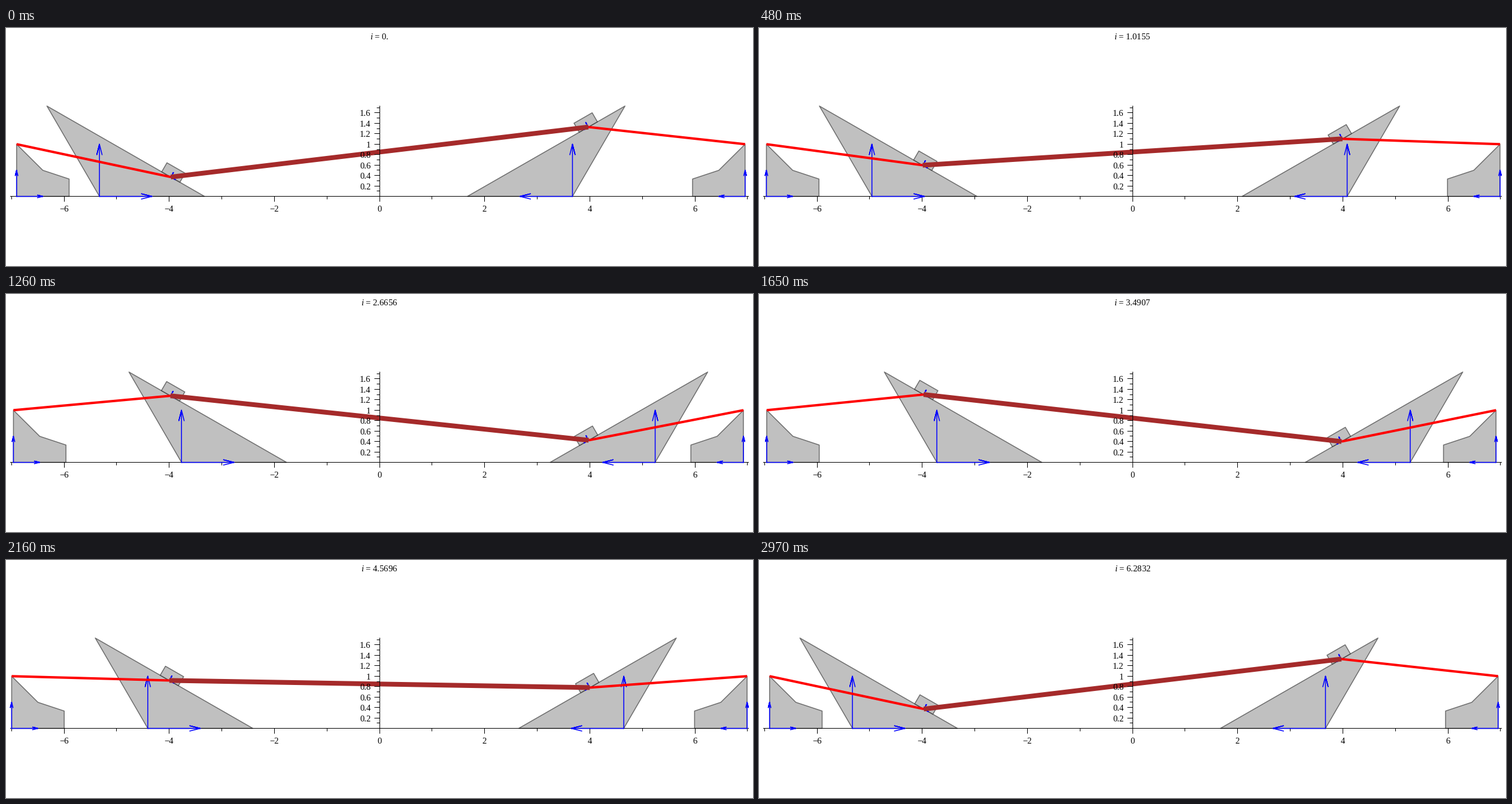
Write a matplotlib script that moves like this. It is 1248 px wide and 398 px high and loops after 3 s.

```python
import numpy as np
import matplotlib.pyplot as plt
from matplotlib.animation import FuncAnimation

W, H, DPI = 1248, 398, 100
FRAMES, INTERVAL = 100, 30
X0, Y0 = 624.1, 281.6          # plot origin in pixels
SX, SY = 87.83, 87.3           # pixels per unit
PIVOT, ARM, LINK, SWING = 0.85, 4.0, 3.0, 0.12
ROOT3 = np.sqrt(3)
PT = 72 / DPI                  # points per pixel

plt.rcParams.update({
    "font.family": "Liberation Serif",
    "font.size": 14.67 * PT,
    "mathtext.fontset": "custom",
    "mathtext.rm": "Liberation Serif",
    "mathtext.it": "Liberation Serif:italic",
    "path.snap": False,
})

fig = plt.figure(figsize=(W / DPI, H / DPI), dpi=DPI, facecolor="white")
ax = fig.add_axes([0, 0, 1, 1])
ax.set_xlim(0, W)
ax.set_ylim(H, 0)
ax.axis("off")


def to_px(points):
    return np.asarray(points, float) * (SX, -SY) + (X0, Y0)


def crisp(value):
    """Centre of the pixel that holds the value."""
    return np.floor(value) + 0.5


def segment(xs, ys, z):
    ax.plot(xs, ys, color="black", lw=PT, zorder=z, solid_capstyle="butt")


def draw_axes():
    cx, cy = crisp(X0), crisp(Y0)
    segment([7, 1241], [cy, cy], 2)
    segment([cx, cx], [130, cy], 6)
    for n in range(-7, 8):
        x = crisp(X0 + n * SX)
        major = n % 2 == 0
        segment([x, x], [cy, cy + (9 if major else 5)], 2)
        if major:
            label = str(n).replace("-", "\u2212")
            ax.text(x, 307, label, ha="center", va="baseline", zorder=7)
    for n in range(1, 18):
        y = crisp(Y0 - n / 10 * SY)
        major = n % 2 == 0
        segment([cx - (9 if major else 5), cx], [y, y], 6)
        if major:
            ax.text(609.5, y + 5.5, f"{n / 10:g}", ha="right",
                    va="baseline", zorder=7)


def arrow(direction, length):
    """Open-headed arrow from the local origin."""
    d = np.array(direction) * length
    side = np.array([-d[1], d[0]]) * 0.05
    back = d * 0.8
    return np.array([(0, 0), d, back + side, d, back - side])


# Local shapes; x points towards the middle of the stage.
DOWNHILL, NORMAL = (ROOT3 / 2, -0.5), (0.5, ROOT3 / 2)
WEDGE = np.array([(0, 0), (2, 0), (-1, ROOT3)])
STOPPER = np.array([(0, 0), (0, 1), (0.5, 0.5), (1, 1 / 3), (1, 0)])
BLOCK = np.array([(-0.2, 0), (0.2, 0), (0.2, 0.2), (-0.2, 0.2)]) @ np.array(
    [DOWNHILL, NORMAL])


class Body:
    """A grey polygon carrying its two blue frame vectors."""

    def __init__(self, shape, side, length, basis=((1, 0), (0, 1))):
        self.shape, self.side = shape, side
        self.vectors = [arrow(b, length) for b in basis]
        self.patch, = ax.fill([0], [0], fc="#c0c0c0", ec=(0, 0, 0, 0.5),
                              lw=1.5 * PT, joinstyle="round", zorder=1)
        self.lines = [ax.plot([], [], color="blue", lw=1.5 * PT, zorder=3,
                              solid_joinstyle="round")[0] for _ in basis]

    def place(self, origin):
        flip = np.array([-self.side, 1])
        self.patch.set_xy(to_px(self.shape * flip + origin))
        for line, vector in zip(self.lines, self.vectors):
            line.set_data(*to_px(vector * flip + origin).T)

    @property
    def artists(self):
        return [self.patch, *self.lines]


draw_axes()
SIDES = (-1, 1)
stoppers = [Body(STOPPER, s, 0.5) for s in SIDES]
wedges = [Body(WEDGE, s, 1.0) for s in SIDES]
blocks = [Body(BLOCK, s, 0.1, (DOWNHILL, NORMAL)) for s in SIDES]
links = [ax.plot([], [], color="red", lw=4 * PT, zorder=4,
                 solid_capstyle="butt")[0] for _ in SIDES]
rod, = ax.plot([], [], color="brown", lw=8 * PT, zorder=5,
               solid_capstyle="butt")
title = ax.text(X0, 19, "", ha="center", va="baseline", zorder=7)


def update(frame):
    i = 2 * np.pi * frame / (FRAMES - 1)
    angle = SWING * np.cos(i)
    ends = []
    for k, side in enumerate(SIDES):
        reach = ARM * np.cos(angle)
        height = PIVOT + side * ARM * np.sin(angle)
        outer = side * (reach + np.sqrt(LINK**2 - (1 - height)**2))
        end = (side * reach, height)
        ends.append(end)
        stoppers[k].place((outer, 0))
        wedges[k].place((side * (reach + 2 - ROOT3 * height), 0))
        blocks[k].place(end)
        links[k].set_data(*to_px([(outer, 1), end]).T)
    rod.set_data(*to_px(ends).T)
    value = f"{i:#.5g}" if frame else "0."
    title.set_text(rf"$\mathit{{i}}$ = {value}")
    bodies = stoppers + wedges + blocks
    return [a for b in bodies for a in b.artists] + links + [rod, title]


anim = FuncAnimation(fig, update, frames=FRAMES, interval=INTERVAL,
                     repeat=True, repeat_delay=0, blit=False)
plt.show()
```
